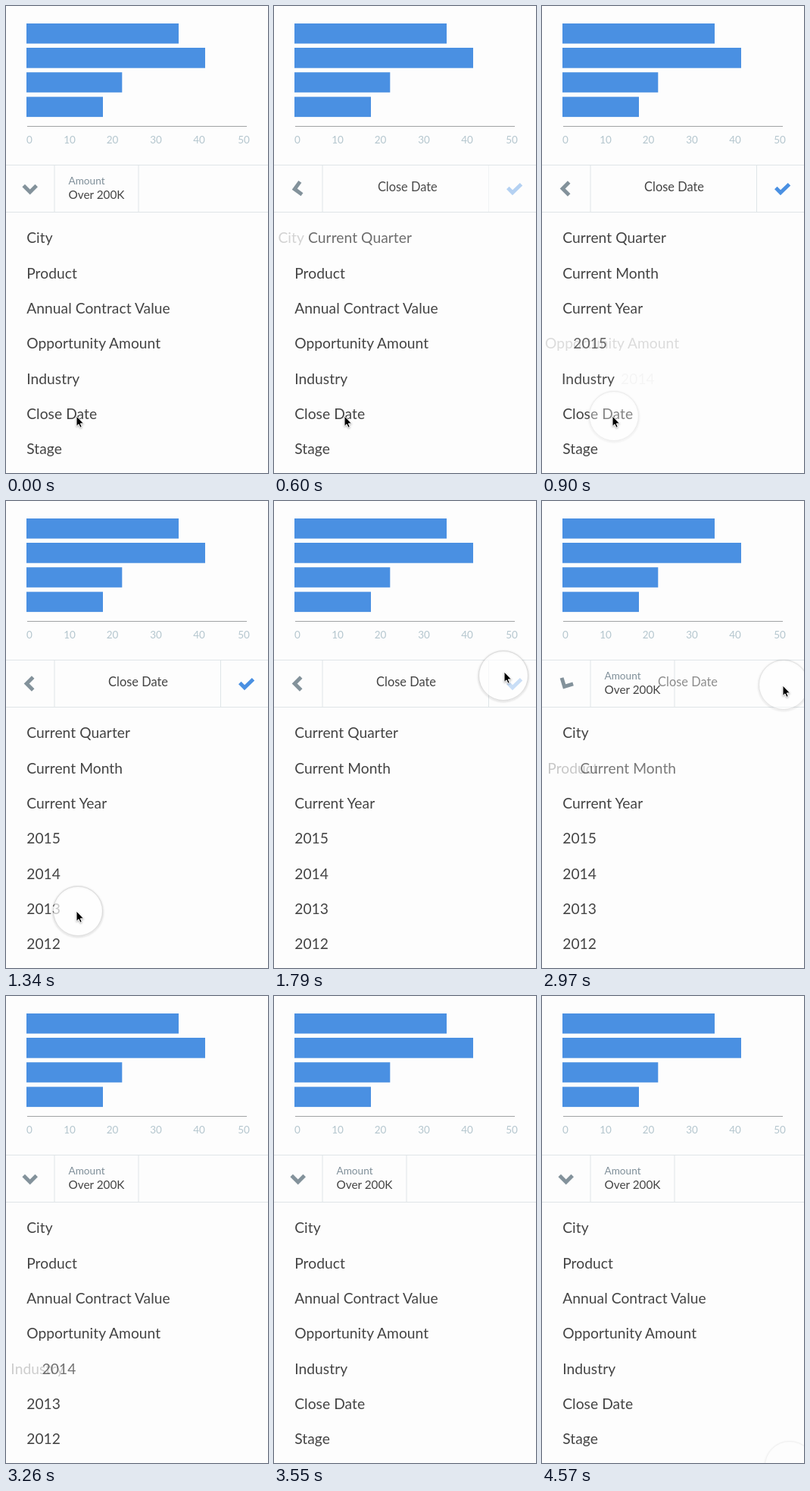
An HTML page that plays this animation: 346 by 615 pixels, repeating every 4.87 s.

```html
<!DOCTYPE html>
<html lang="en">
<head>
<meta charset="utf-8">
<title>Filter picker</title>
<style>
  html, body { margin: 0; width: 100%; height: 100%; overflow: hidden; background: #fdfdfd; }
  svg { display: block; width: 346px; height: 615px; font-family: Lato, "Open Sans", sans-serif; fill: #444; }
  .bars { fill: #4a90e2; }
  .axis { font-size: 13.5px; fill: #b4c6ce; text-anchor: middle; }
  .rule { stroke: #dfe5e8; fill: none; }
  .rows { font-size: 19.2px; letter-spacing: .07px; }
  .label { font-size: 13.6px; fill: #7f8f99; }
  .value { font-size: 15.3px; }
  .title { font-size: 16.4px; text-anchor: middle; }
  .icon { fill: none; stroke-width: 5; }
  #disc { fill: #fff; fill-opacity: .7; stroke: #000; stroke-opacity: .1; }
  #halo { fill: none; stroke: #000; stroke-opacity: .17; stroke-width: 1.4; filter: blur(1px); }
  #pointer { fill: #000; stroke: #fff; stroke-width: 1; filter: drop-shadow(0 1px 1px rgba(0, 0, 0, .3)); }
</style>
</head>
<body>
<svg viewBox="0 0 346 615">
  <g class="bars">
    <rect x="27" y="23" width="201" height="26.5"/>
    <rect x="27" y="55" width="236" height="26.7"/>
    <rect x="27" y="87.3" width="126.3" height="26.5"/>
    <rect x="27" y="119.6" width="101" height="26.5"/>
  </g>
  <path d="M28 158.5H318" stroke="#a0a3a4"/>
  <g class="axis">
    <text x="31" y="181">0</text><text x="84" y="181">10</text><text x="140.5" y="181">20</text>
    <text x="198" y="181">30</text><text x="255" y="181">40</text><text x="314" y="181">50</text>
  </g>

  <path class="rule" d="M0 209.5H346M0 271.5H346M64 209.5V271.5"/>
  <path id="chevron" class="icon" stroke="#83929b" d="M-8.5 -4L0 4.5L8.5 -4"/>
  <g id="amount">
    <path class="rule" d="M175 210V271"/>
    <text class="label" x="82.5" y="235">Amount</text>
    <text class="value" x="82.5" y="254.3">Over 200K</text>
  </g>
  <text id="title" class="title" x="174.5" y="243.5">Close Date</text>
  <g id="apply">
    <path class="rule" d="M283.5 210V271"/>
    <path class="icon" stroke="#4a90e2" d="M308.8 239.5L315 245.7L326.5 234.8"/>
  </g>

  <g id="rows" class="rows"></g>

  <g id="touch">
    <circle id="halo" r="33" cy="1"/>
    <circle id="disc" r="32.5"/>
  </g>
  <path id="pointer" d="M0 0V13.5L3 10.8L5 15.3L7.3 14.3L5.3 9.9H9.6Z"/>
</svg>
<script>
const LOOP = 4870;
const FADE = 125, STAGGER = 98;      // list rows swap one after another
const OPEN = 503, CLOSE = 2836;      // first row of each swap
const OUT_SHIFT = -28, IN_SHIFT = 80, TITLE_SHIFT = 45;

const fields = ["City", "Product", "Annual Contract Value", "Opportunity Amount", "Industry", "Close Date", "Stage"];
const periods = ["Current Quarter", "Current Month", "Current Year", "2015", "2014", "2013", "2012"];

// time, pointer x, pointer y, disc x, disc y
const path = [
  [1340, 93, 540, 95, 540],
  [1490, 148, 455, 155, 451],
  [1640, 262, 288, 262, 292],
  [1790, 304, 225, 303, 230],
  [2530, 320, 241, 322, 239],
  [2680, 318, 243, 319, 242]
];

// The picture advances in steps of 150 ms, some of them 140 ms.
const shortSteps = [6, 14, 18, 20, 22, 25, 28, 30];
const steps = [0];
for (let i = 0; i < 32; i++) steps.push(steps[i] + (shortSteps.includes(i) ? 140 : 150));

const $ = id => document.getElementById(id);
const ramp = (t, start, span) => Math.min(1, Math.max(0, (t - start) / span));
const swing = (t, start, back, span = FADE) => ramp(t, start, span) - ramp(t, back, span);

function place(el, x, y, opacity) {
  el.setAttribute("transform", `translate(${x} ${y})`);
  el.setAttribute("opacity", opacity);
}

function along(t) {
  if (t >= path.at(-1)[0]) return path.at(-1).slice(1);
  const i = Math.max(1, path.findIndex(k => k[0] > t));
  const a = path[i - 1], b = path[i], p = ramp(t, a[0], b[0] - a[0]);
  return a.map((v, j) => v + (b[j] - v) * p).slice(1);
}

function addRow(text, i) {
  const el = document.createElementNS("http://www.w3.org/2000/svg", "text");
  el.setAttribute("x", 27.2);
  el.setAttribute("y", 312.3 + i * 46.33);
  el.textContent = text;
  $("rows").append(el);
  return el;
}

const rows = fields.map((name, i) => [addRow(name, i), addRow(periods[i], i)]);

function draw(t) {
  rows.forEach(([field, period], i) => {
    const p = swing(t, OPEN + i * STAGGER, CLOSE + i * STAGGER);
    place(field, OUT_SHIFT * p, 0, 1 - p);
    place(period, IN_SHIFT * (1 - p), 0, p);
  });

  const turn = swing(t, 420, 2832, 200);
  $("chevron").setAttribute("transform", `translate(31.7 240.4) rotate(${90 * turn})`);

  const gone = swing(t, 400, 2820);
  place($("amount"), OUT_SHIFT * gone, 0, 1 - gone);
  const shown = swing(t, 480, 2920);
  place($("title"), TITLE_SHIFT * (1 - shown), 0, shown);
  place($("apply"), 0, 0, swing(t, 550, 2800));

  const [px, py, dx, dy] = along(t);
  place($("pointer"), px, py, 1 - ramp(t, 2990, 250));
  if (t < 4000) place($("touch"), dx, dy, swing(t, 750, 2900, 300));
  else place($("touch"), 327, 619, 0.35 * ramp(t, 4200, 370));
}

function tick(now) {
  const t = now % LOOP;
  draw(steps.findLast(s => s <= t));
  requestAnimationFrame(tick);
}
draw(0);
requestAnimationFrame(tick);
</script>
</body>
</html>
```
